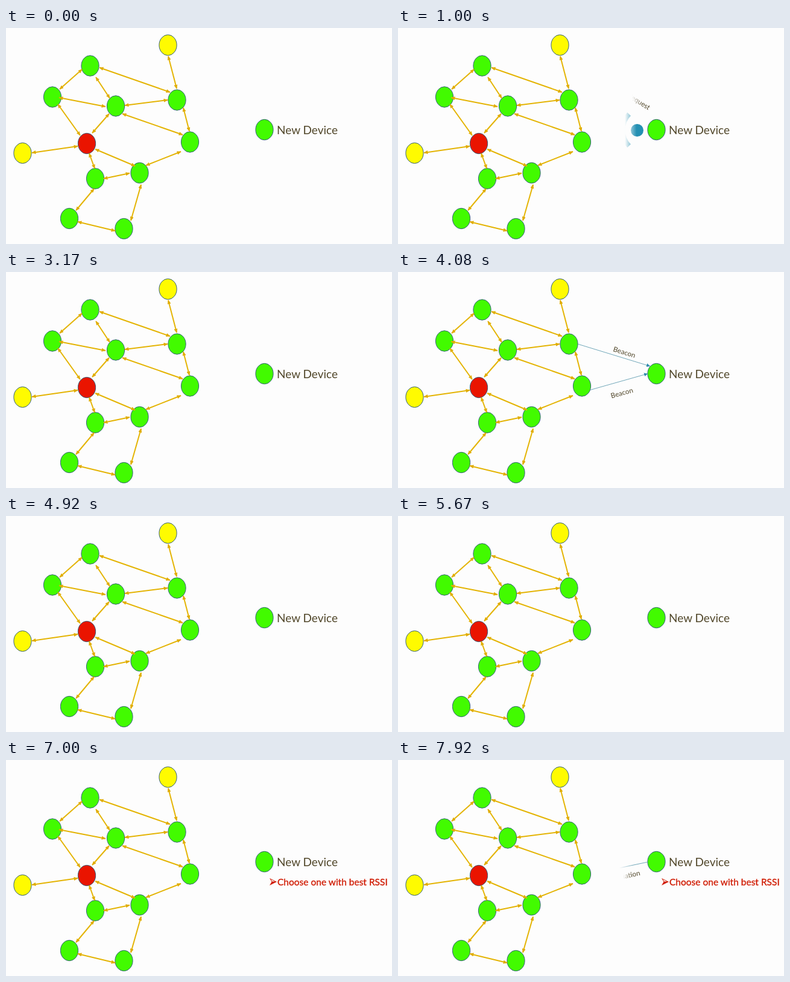
An HTML page for the animation above (8000 ms loop, 640x360 px).

```html
<!DOCTYPE html>
<html lang="en">
<head>
<meta charset="utf-8">
<title>Device joining a mesh network</title>
<style>
  html, body { margin: 0; width: 100%; height: 100%; overflow: hidden; background: #fdfdfd; }
  svg { display: block; width: 100vw; height: 100vh; }
  text { font-family: Lato, "Open Sans", sans-serif; fill: #51472a; }
  .small { font-size: 11.6px; }
  .link { stroke: #e4b404; stroke-width: 2; marker-start: url(#gold); marker-end: url(#gold); }
  .signal { stroke: #6fa6b8; stroke-width: 1; marker-end: url(#blue); }
  .node { stroke: #35607c; stroke-width: 1; }
  .arc { fill: none; stroke: #2590b3; stroke-width: 8; }
</style>
</head>
<body>
<svg id="stage" viewBox="0 0 640 360">
  <defs>
    <marker id="gold" viewBox="0 0 7 6" refX="6.4" refY="3" markerWidth="7" markerHeight="6"
      markerUnits="userSpaceOnUse" orient="auto-start-reverse"><path d="M0 0L7 3L0 6Z" fill="#e0ac00"/></marker>
    <marker id="blue" viewBox="0 0 6 6" refX="6" refY="3" markerWidth="6" markerHeight="6"
      markerUnits="userSpaceOnUse" orient="auto"><path d="M0 0L6 3L0 6Z" fill="#2f8aad"/></marker>
  </defs>
  <g id="nodes"></g>
  <g id="links"></g>
  <text x="449" y="176.5" font-size="19">New Device</text>

  <g id="waves">
    <circle cx="396.5" cy="170.5" r="10.5" fill="#2590b3"/>
  </g>
  <g id="request"><text class="small" transform="translate(345.5 93) rotate(32.3)">Beacon Request</text></g>

  <g id="beacons">
    <line class="signal" x1="298" y1="120" x2="418" y2="157"/>
    <line class="signal" x1="319" y1="196.5" x2="414" y2="169.5"/>
    <text class="small" transform="translate(356 132) rotate(17)">Beacon</text>
    <text class="small" transform="translate(354 210.5) rotate(-15.5)">Beacon</text>
  </g>

  <g id="choice">
    <path d="M437 197L449 203L437 209L440.5 203Z" fill="#d01c04"/>
    <path d="M439 199L446 202.6H441.4Z" fill="#fdfdfd"/>
    <text x="450" y="209" font-size="15.5" style="fill:#d01c04;stroke:#d01c04;stroke-width:.35">Choose one with best RSSI</text>
  </g>

  <g id="joinLine"><line class="signal" x1="414" y1="170" x2="320" y2="190"/></g>
  <g id="joinText"><text class="small" text-anchor="end" transform="translate(402 192) rotate(-12)">Association</text></g>
</svg>
<script>
const LOOP = 8000, FPS = 12;
const $ = id => document.getElementById(id);

function add(parent, tag, attrs) {
  const el = document.createElementNS(parent.namespaceURI, tag);
  for (const key in attrs) el.setAttribute(key, attrs[key]);
  return parent.appendChild(el);
}

const nodes = {
  '#42fb00': [[139.5, 63], [77, 115], [182, 130], [283.5, 120], [305, 190], [148, 251],
    [221.5, 241.5], [105, 317.5], [195.5, 334.5], [428.5, 169.5]],
  '#fffb00': [[268.5, 28.5], [27.5, 208.5]],
  '#ea1400': [[134, 192.5]]
};
for (const fill in nodes)
  for (const [cx, cy] of nodes[fill])
    add($('nodes'), 'ellipse', { class: 'node', cx, cy, rx: 14.6, ry: 17.2, fill });

const links = [
  [89, 102, 126, 69], [155, 66, 272, 107], [149, 82, 172, 117], [88, 116, 165, 131],
  [197, 129, 268, 120], [269, 47, 283, 101], [86, 127, 123, 179], [171, 143, 143, 175],
  [193, 143, 293, 178], [294, 133, 304, 172], [43, 208, 119, 197], [148, 202, 214, 230],
  [138, 209, 147, 234], [162, 251, 205, 242], [232, 229, 290, 206], [146, 268, 116, 304],
  [119, 323, 181, 338], [224, 261, 207, 321]
];
for (const [x1, y1, x2, y2] of links) add($('links'), 'line', { class: 'link', x1, y1, x2, y2 });

// Arcs share one centre and opening angle
for (const r of [38.5, 59, 79]) {
  const a = 43.5 * Math.PI / 180, x = 411 - r * Math.cos(a), dy = r * Math.sin(a);
  add($('waves'), 'path', { class: 'arc', d: `M${x} ${170 - dy}A${r} ${r} 0 0 0 ${x} ${170 + dy}` });
}

// Soft-edged wipes travelling from x = from to x = to
const wipes = [
  { id: 'waves', from: 407, to: 327, start: 845, end: 3000 },
  { id: 'request', from: 415, to: 345, start: 845, end: 3000 },
  { id: 'beacons', from: 298, to: 418, start: 3350, end: 4900 },
  { id: 'joinLine', from: 414, to: 320, start: 7715, end: LOOP },
  { id: 'joinText', from: 402, to: 345, start: 7715, end: LOOP }
];
const WIPE = 500, EDGE = 0.24;
for (const w of wipes) {
  const defs = document.querySelector('defs');
  w.grad = add(defs, 'linearGradient', { id: w.id + 'Edge', gradientUnits: 'userSpaceOnUse', y1: 0, y2: 0 });
  add(w.grad, 'stop', { offset: 0, 'stop-color': '#fff' });
  add(w.grad, 'stop', { offset: 1, 'stop-color': '#000' });
  const area = { x: 0, y: 0, width: 640, height: 360 };
  const mask = add(defs, 'mask', { id: w.id + 'Mask', maskUnits: 'userSpaceOnUse', ...area });
  add(mask, 'rect', { ...area, fill: `url(#${w.id}Edge)` });
  $(w.id).setAttribute('mask', `url(#${w.id}Mask)`);
}

const clamp = v => Math.min(1, Math.max(0, v));

function draw(t) {
  for (const w of wipes) {
    const p = clamp((t - w.start) / WIPE), span = w.to - w.from;
    const lead = w.from + span * (1 + EDGE) * p;
    $(w.id).style.display = p > 0 && t < w.end ? '' : 'none';
    w.grad.setAttribute('x1', lead - span * EDGE);
    w.grad.setAttribute('x2', lead);
  }
  $('choice').style.opacity = clamp((t - 5980) / 500);
}

function tick() {
  const t = performance.now() % LOOP;
  draw(Math.floor((t + 5) * FPS / 1000) * 1000 / FPS % LOOP);
  requestAnimationFrame(tick);
}
tick();
</script>
</body>
</html>
```
